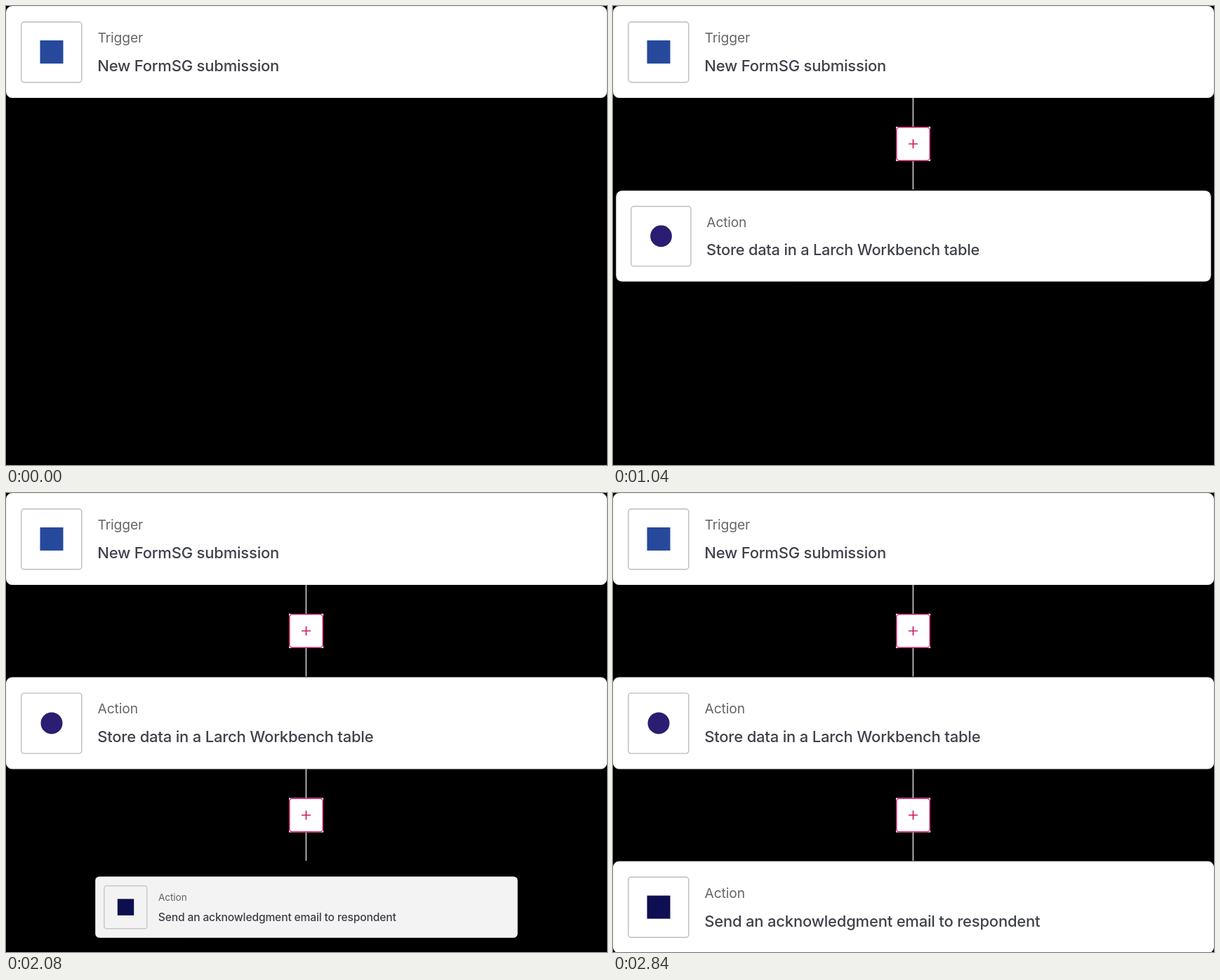
These frames come from a looping animation (856x654 px, 3 s). An HTML page:

```html
<!DOCTYPE html>
<html lang="en">
<head>
<meta charset="utf-8">
<title>Workflow steps</title>
<style>
  html, body { margin: 0; width: 100%; height: 100%; overflow: hidden; background: #000; }
  svg { display: block; font-family: Inter, sans-serif; font-optical-sizing: none; }
  .card { fill: #fff; stroke: #ececee; }
  .tile { fill: none; stroke: #bdbdbd; stroke-width: 1.4; }
  .label { font-size: 19.25px; letter-spacing: -.12px; fill: #666; }
  .title { font-size: 22px; font-weight: 500; letter-spacing: -.2px; fill: #3f414b; }
  .line { stroke: #f0f0f0; stroke-width: 1.3; }
  .button { fill: none; stroke: #cf1a68; stroke-width: 1.5; }
  .plus { fill: none; stroke: #cf1a68; stroke-width: 1.7; }
</style>
</head>
<body>
<svg id="stage" width="856" height="654" viewBox="0 0 856 654"></svg>
<script>
const LOOP = 3000, STEP = 40, START_SCALE = 0.5;
const stage = document.getElementById('stage');

const square = color => `<rect x="48.5" y="49" width="33" height="33" fill="${color}"/>`;
const circle = color => `<circle cx="65" cy="65.5" r="15.5" fill="${color}"/>`;

const card = (label, title, icon) => `
  <rect class="card" x=".5" y=".5" width="855" height="130" rx="8"/>
  <rect class="tile" x="21.8" y="22.7" width="86" height="86" rx="4"/>
  ${icon}
  <text class="label" x="130.5" y="52">${label}</text>
  <text class="title" x="130.2" y="93">${title}</text>`;

const connector = `
  <path class="line" d="M427.4 0V130.5"/>
  <rect x="403" y="41" width="49" height="49" fill="#fff"/>
  <rect class="button" x="403.75" y="41.75" width="47.5" height="47.5" rx="4"/>
  <path class="plus" d="M421 65.5h13M427.5 59v13"/>`;

const parts = [
  { y: 0, body: card('Trigger', 'New FormSG submission', square('#26499c')) },
  { y: 131, start: 60, length: 500, body: connector },
  { y: 262.4, start: 400, length: 880,
    body: card('Action', 'Store data in a Larch Workbench table', circle('#2b1d72')) },
  { y: 393.5, start: 1180, length: 880, body: connector },
  { y: 524.6, start: 1960, length: 880,
    body: card('Action', 'Send an acknowledgment email to respondent', square('#0e0f52')) },
];

for (const part of parts) {
  part.node = document.createElementNS('http://www.w3.org/2000/svg', 'g');
  part.node.innerHTML = part.body;
  part.node.setAttribute('transform', `translate(0 ${part.y})`);
  stage.append(part.node);
}

// Share of the growth still to come, for cubic-bezier(.245, 1, .69, 1).
function remaining(x) {
  if (x >= 1) return 0;
  let low = 0, high = 1;
  for (let i = 0; i < 24; i++) {
    const u = (low + high) / 2, v = 1 - u;
    if (3 * u * v * v * 0.245 + 3 * u * u * v * 0.69 + u ** 3 < x) low = u;
    else high = u;
  }
  return (1 - low) ** 3;
}

function draw(time) {
  for (const { node, y, start, length } of parts) {
    if (start === undefined) continue;
    const progress = (time - start) / length;
    node.style.display = progress > 0 ? '' : 'none';
    if (progress <= 0) continue;
    const rest = remaining(progress);
    const scale = 1 - (1 - START_SCALE) * rest;
    node.setAttribute('transform',
      `translate(427.8 ${y + 65.5}) scale(${scale}) translate(-427.8 -65.5)`);
    node.setAttribute('opacity', 1 - 0.08 * rest);
    // The outer edge fades in last.
    node.style.clipPath = rest > 0.01 ? `inset(${20 * rest ** 3}px round 8px) stroke-box` : 'none';
  }
}

function tick() {
  draw(Math.floor(performance.now() % LOOP / STEP) * STEP);
  requestAnimationFrame(tick);
}
tick();
</script>
</body>
</html>
```
